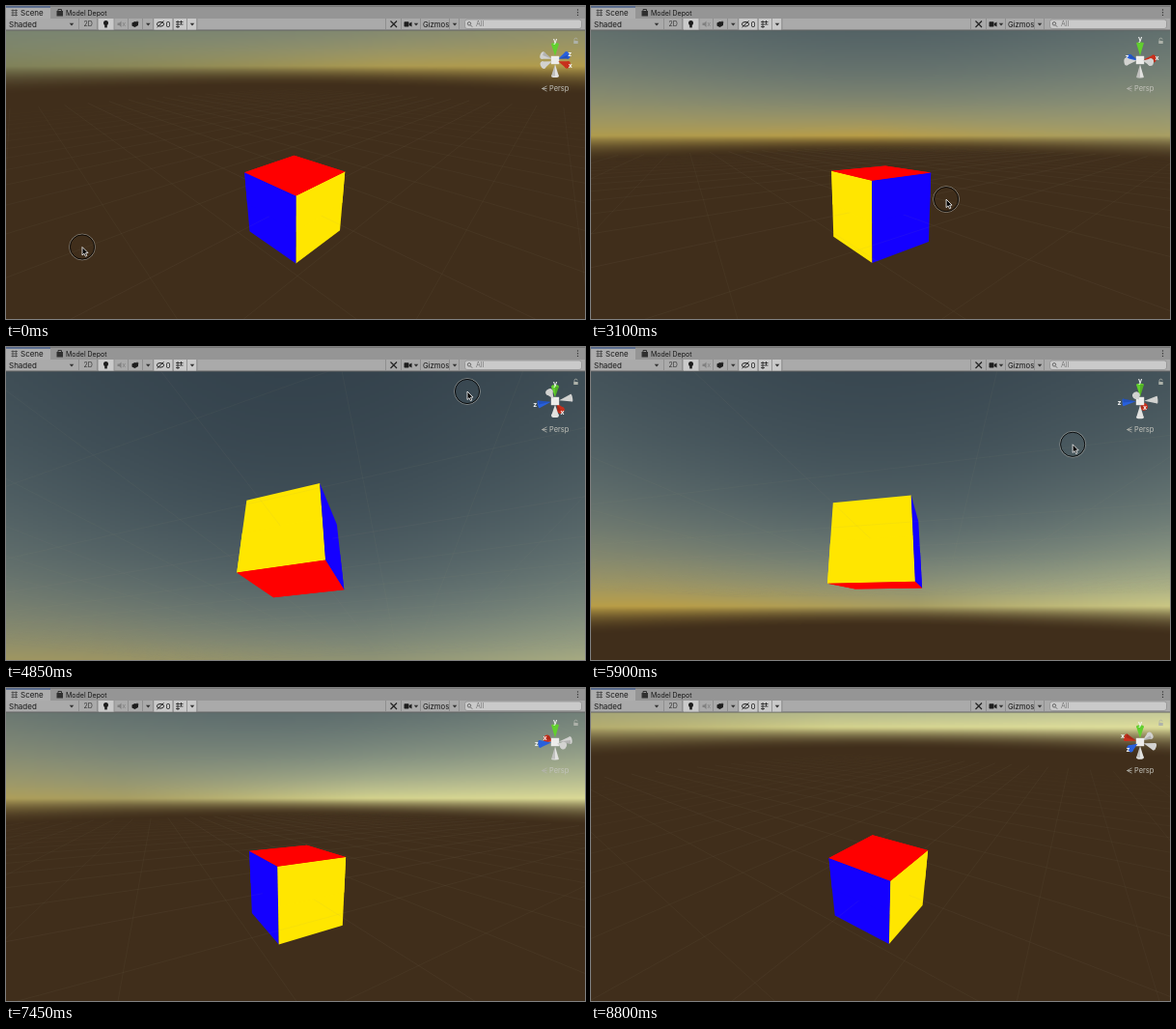
An HTML page with a canvas for the animation above (8.85 s loop, 600 by 324 pixels).

```html
<!DOCTYPE html>
<html lang="en">
<head>
<meta charset="utf-8">
<title>Scene view orbit</title>
<style>
html, body { margin: 0; width: 100%; height: 100%; overflow: hidden; background: #402e1b; }
canvas, svg { position: absolute; left: 0; top: 0; width: 600px; height: 324px; }
text { font-family: Inter, Roboto, sans-serif; font-size: 8px; fill: #161616; }
.small { font-size: 7px; }
</style>
</head>
<body>
<canvas id="view" width="600" height="324"></canvas>
<svg viewBox="0 0 600 324">
  <defs><path id="drop" d="M-2.3-1.2h4.6L0 1.5z" fill="#333"/></defs>
  <rect width="600" height="13" fill="#959595"/>
  <rect width="46" height="13" fill="#adadad"/>
  <path d="M0 .5H600" stroke="#777"/>
  <path d="M0 1H46" stroke="#49618d" stroke-width="1.4"/>
  <rect y="13" width="600" height="12" fill="#aaa"/>
  <path d="M0 25H600" stroke="#636363"/>
  <g fill="#cacaca">
    <rect x="96" y="13" width="16" height="11.5"/>
    <rect x="153.5" y="13" width="19" height="11.5"/>
    <rect x="174" y="13" width="23" height="11.5"/>
    <rect x="475.5" y="14" width="121" height="9.5" rx="2.5" stroke="#8c8c8c" stroke-width=".7"/>
  </g>
  <path d="M75.5 13v12M94.5 13v12M112 13v12M126.5 13v12M141.5 13v12M152.5 13v12M173 13v12M187.5 13v12M198 13v12M393.5 13v12M409.5 13v12M429.5 13v12M459.5 13v12M469.5 13v12" stroke="#888" stroke-width=".8"/>
  <path d="M5.5 4.5h6.5M5.5 7h6.5M5.5 9.500h6.500M7 3.500v7M10.300 3.500v7" stroke="#444" stroke-width=".8"/>
  <path d="M52.500 5h6.500v5.500h-6.500z" fill="#303030"/>
  <path d="M54 5V3.500h3.500V5" fill="none" stroke="#303030"/>
  <g fill="#333"><circle cx="592.500" cy="4" r=".7"/><circle cx="592.500" cy="6.700" r=".7"/><circle cx="592.500" cy="9.400" r=".7"/></g>
  <text x="15" y="10">Scene</text>
  <text x="62" y="10" class="small">Model Depot</text>
  <text x="3" y="21.500">Shaded</text>
  <text x="80.500" y="21.300" class="small" fill-opacity=".8">2D</text>
  <text x="165.500" y="21.500">0</text>
  <text x="432" y="21.500" style="font-size:7.700px">Gizmos</text>
  <text x="487" y="21.300" class="small" style="fill:#777">All</text>
  <use href="#drop" x="68" y="19"/><use href="#drop" x="147.300" y="19"/><use href="#drop" x="193" y="19"/>
  <use href="#drop" x="425" y="19"/><use href="#drop" x="465" y="19"/>
  <g fill="#1d1d1d">
    <circle cx="103.500" cy="17.500" r="2.500"/><path d="M102.200 19h2.600v3.400h-2.600z"/>
    <path d="M115.500 17.500h2l2-2v6.500l-2-2h-2z" fill="#808080"/>
    <path d="M130.500 17.500l3-1.500 3.500 1v3l-3.500 2-3-1.500z"/>
    <path d="M136 15l.6 1.400 1.400.6-1.400.6-.6 1.400-.6-1.400-1.400-.6 1.400-.6z"/>
    <rect x="412.500" y="16.300" width="5" height="5.200" rx=".7"/><path d="M417.800 18l2.700-1.600v5L417.800 20z"/>
  </g>
  <g fill="none" stroke="#222">
    <path d="M121 17l2.500 4M123.500 17l-2.500 4" stroke="#808080" stroke-width=".7"/>
    <ellipse cx="160" cy="18.800" rx="3.600" ry="2.300"/><path d="M156.500 22l7-6.500"/>
    <path d="M176 16.500h7.500M176 19h7.500M176 21.500h4M178 15v8M181.500 15v4" stroke-width=".8"/>
    <path d="M398.500 15.500l6.500 6.500M405 15.500l-6.500 6.500" stroke-width="1.200"/>
    <circle cx="480" cy="18.300" r="1.700" stroke="#666"/><path d="M481.500 20l1.600 1.600" stroke="#666"/>
    <path d="M560.500 82.800l-5 2.700 5 2.700M555.500 85.500h5" stroke="#b4b4ac" stroke-width=".8"/>
    <path d="M589 36v-1.300a1.500 1.500 0 0 1 3 0" stroke="#aeb2aa" stroke-width=".8"/>
  </g>
  <rect x="588.300" y="36" width="4.400" height="3" fill="#aeb2aa"/>
  <text x="563" y="88" style="font-size:7.400px;fill:#c4c4bc">Persp</text>
</svg>
<script>
const LOOP = 8850, STEP = 50, RAD = Math.PI / 180;
const CX = 299.4, CY = 174.5, FOCAL = 260, DIST = 3.55;
const TOP = 0.04, MID = -0.46, LOW = -0.96;   // heights relative to the orbit pivot
const YELLOW = '#ffe600', BLUE = '#1400ff', RED = '#ff0000';

const times = [0, 1900, 3800, 4850, 6700, 7450, 8800];
const track = {
  yaw: [1, 32.7, 105.3, 115.3, 129, 163.6, 190],
  pitch: [23.3, 24.5, -6.3, -34, -2.5, 13, 27.2],
  mx: [79, 199, 444, 478, 522, 640, 736],
  my: [249.5, 256.5, 146, 46, 166, 218, 262]
};

// Horizon tint by compass angle
const tints = [
  [-90, 200, 200, 140], [-50, 125, 128, 90], [20, 172, 154, 80], [80, 186, 158, 70],
  [130, 168, 158, 98], [180, 212, 210, 140], [240, 224, 224, 158], [270, 200, 200, 140]
];
const GROUND = [64, 46, 27], HAZE = [130, 149, 146], ZENITH = [46, 60, 71];

const ctx = document.getElementById('view').getContext('2d');
const sky = document.createElement('canvas');
sky.width = 120; sky.height = 150;
const skyCtx = sky.getContext('2d');
const skyData = skyCtx.createImageData(sky.width, sky.height);

const mix = (a, b, k) => a + (b - a) * k;

// Monotone cubic interpolation
function sample(v, t) {
  const n = times.length;
  let i = 0;
  while (i < n - 2 && t >= times[i + 1]) i++;
  const slope = j => (v[j + 1] - v[j]) / (times[j + 1] - times[j]);
  const tangent = j => {
    if (j === 0) return 0;
    if (j === n - 1) return slope(j - 1);
    const a = slope(j - 1), b = slope(j);
    return a * b <= 0 ? 0 : 2 * a * b / (a + b);
  };
  const h = times[i + 1] - times[i], s = (t - times[i]) / h, r = 1 - s;
  return v[i] * (1 + 2 * s) * r * r + tangent(i) * h * s * r * r
    + v[i + 1] * s * s * (3 - 2 * s) - tangent(i + 1) * h * s * s * r;
}

function tintAt(az) {
  az = ((az + 90) % 360 + 360) % 360 - 90;
  let i = 0;
  while (i < tints.length - 2 && az > tints[i + 1][0]) i++;
  const a = tints[i], b = tints[i + 1], k = (az - a[0]) / (b[0] - a[0]);
  return [1, 2, 3].map(c => mix(a[c], b[c], k));
}

function drawSky(yaw, pitch) {
  const sp = Math.sin(pitch * RAD), cp = Math.cos(pitch * RAD), d = skyData.data;
  let o = 0;
  for (let j = 0; j < sky.height; j++) {
    const y = (CY - 25 - (j + 0.5) * 2) / FOCAL;
    const up = y * cp - sp, fwd = cp + y * sp;
    for (let i = 0; i < sky.width; i++, o += 4) {
      const x = ((i + 0.5) * 5 - CX) / FOCAL;
      const el = Math.atan2(up, Math.hypot(x, fwd)) / RAD;
      let rgb = GROUND;
      if (el > -4) {
        const tint = tintAt(yaw + Math.atan2(x, fwd) / RAD);
        const e = Math.max(el, 0), near = Math.exp(-e / 6), high = 1 - Math.exp(-e / 24);
        const k = Math.min(1, (el + 4) / 4) ** 2;
        rgb = tint.map((c, n) => mix(GROUND[n], mix(mix(HAZE[n], ZENITH[n], high), c, near), k));
      }
      d[o] = rgb[0]; d[o + 1] = rgb[1]; d[o + 2] = rgb[2]; d[o + 3] = 255;
    }
  }
  skyCtx.putImageData(skyData, 0, 0);
  ctx.drawImage(sky, 0, 25, 600, 300);
}

function makeCamera(yaw, pitch) {
  const a = (yaw + 45) * RAD, p = pitch * RAD;
  const sa = Math.sin(a), ca = Math.cos(a), sp = Math.sin(p), cp = Math.cos(p);
  // Right, up, towards the viewer
  const turn = (x, y, z) => {
    const r = x * ca - z * sa;
    return [x * sa + z * ca, y * cp - r * sp, y * sp + r * cp];
  };
  const flat = ([u, v, w]) => [CX + FOCAL * u / (DIST - w), CY - FOCAL * v / (DIST - w)];
  return { turn, flat, sa, ca, height: DIST * sp, reach: DIST * cp };
}

function polygon(points, color) {
  ctx.beginPath();
  points.forEach(p => ctx.lineTo(p[0], p[1]));
  ctx.closePath();
  ctx.fillStyle = color;
  ctx.fill();
}

function drawCube(cam, low, high) {
  const at = (x, y, z) => cam.flat(cam.turn(x, y, z));
  const sides = [[1, 0, YELLOW], [0, 1, BLUE], [-1, 0, YELLOW], [0, -1, BLUE]];
  for (const [nx, nz, color] of sides) {
    if (cam.reach * (nx * cam.ca - nz * cam.sa) <= 0.5) continue;
    const x = nx / 2, z = nz / 2;
    polygon([at(x - z, low, z + x), at(x + z, low, z - x),
      at(x + z, high, z - x), at(x - z, high, z + x)], color);
  }
  const cap = y => polygon([at(-.5, y, -.5), at(.5, y, -.5), at(.5, y, .5), at(-.5, y, .5)], RED);
  if (high === TOP && cam.height > TOP) cap(TOP);
  if (low === LOW && cam.height < LOW) cap(LOW);
}

function drawGrid(cam) {
  const size = 16, limit = DIST - 0.1;
  const line = (a, b) => {
    if (a[2] > b[2]) [a, b] = [b, a];
    if (a[2] > limit) return;
    if (b[2] > limit) {
      const k = (limit - a[2]) / (b[2] - a[2]);
      b = b.map((v, i) => mix(a[i], v, k));
    }
    ctx.beginPath();
    ctx.moveTo(...cam.flat(a));
    ctx.lineTo(...cam.flat(b));
    ctx.stroke();
  };
  ctx.lineWidth = 0.8;
  for (let k = -size; k <= size; k++) {
    ctx.strokeStyle = `rgba(150,145,125,${0.1 * (1 - Math.abs(k) / (size + 1))})`;
    line(cam.turn(k, MID, -size), cam.turn(k, MID, size));
    line(cam.turn(-size, MID, k), cam.turn(size, MID, k));
  }
}

function drawCone([u, v, w], color, label) {
  const fade = Math.min(1, Math.max(0, (0.985 - Math.abs(w)) / 0.06));
  if (!fade) return;
  const ang = Math.atan2(-v, u), far = 18 * Math.hypot(u, v), near = far * 0.25, wide = 3.9;
  ctx.save();
  ctx.globalAlpha = fade;
  ctx.rotate(ang);
  polygon([[near, 0], [far, -wide], [far, wide]], color);
  ctx.beginPath();
  ctx.ellipse(far, 0, wide * Math.abs(w), wide, 0, 0, 7);
  ctx.fill();
  if (w < 0) polygon([[near, 0], [far, 0], [far, wide]], 'rgba(0,0,0,.15)');
  ctx.restore();
  if (label) {
    ctx.globalAlpha = fade;
    ctx.fillStyle = '#f4f4f4';
    ctx.fillText(label, 22 * u, -22 * v);
    ctx.globalAlpha = 1;
  }
}

function drawGizmo(cam) {
  const cones = [
    [1, 0, 0, '#c8301c', 'x'], [0, 1, 0, '#62cf2e', 'y'], [0, 0, 1, '#2860dc', 'z'],
    [-1, 0, 0, '#d2d2d0'], [0, -1, 0, '#e2e2e0'], [0, 0, -1, '#d2d2d0']
  ].map(([x, y, z, color, label]) => ({ dir: cam.turn(x, y, z), color, label }))
    .sort((a, b) => a.dir[2] - b.dir[2]);
  ctx.save();
  ctx.translate(569, 56);
  ctx.font = 'bold 7px Inter, Roboto, sans-serif';
  ctx.textAlign = 'center';
  ctx.textBaseline = 'middle';
  const show = c => drawCone(c.dir, c.color, c.label);
  cones.filter(c => c.dir[2] < 0).forEach(show);
  ctx.fillStyle = '#ececea';
  ctx.fillRect(-4.2, -4.2, 8.4, 8.4);
  cones.filter(c => c.dir[2] >= 0).forEach(show);
  ctx.restore();
}

function drawPointer(x, y) {
  const ring = (r, color) => {
    ctx.beginPath();
    ctx.arc(x, y, r, 0, 7);
    ctx.strokeStyle = color;
    ctx.stroke();
  };
  ctx.lineWidth = 1;
  ring(13.4, 'rgba(180,180,175,.6)');
  ring(12.6, 'rgba(0,0,0,.85)');
  const tip = [[0, 0], [0, 8.5], [2, 6.7], [3.4, 9.7], [4.8, 9], [3.5, 6.2], [6, 6]];
  polygon(tip.map(p => [x + p[0], y + p[1]]), '#000');
  ctx.lineWidth = 0.8;
  ctx.strokeStyle = '#fff';
  ctx.stroke();
}

function draw(t) {
  const s = {};
  for (const key in track) s[key] = sample(track[key], t);
  const cam = makeCamera(s.yaw, s.pitch);
  drawSky(s.yaw, s.pitch);
  // The grid cuts the cube at half height, so the half nearer the camera goes last
  drawCube(cam, LOW, TOP);
  drawGrid(cam);
  if (cam.height > MID) drawCube(cam, MID, TOP);
  else drawCube(cam, LOW, MID);
  drawGizmo(cam);
  drawPointer(s.mx, s.my);
}

const start = performance.now();
let last = -1;
function tick() {
  const t = Math.floor((performance.now() - start) % LOOP / STEP) * STEP;
  if (t !== last) draw(last = t);
  requestAnimationFrame(tick);
}
tick();
</script>
</body>
</html>
```
